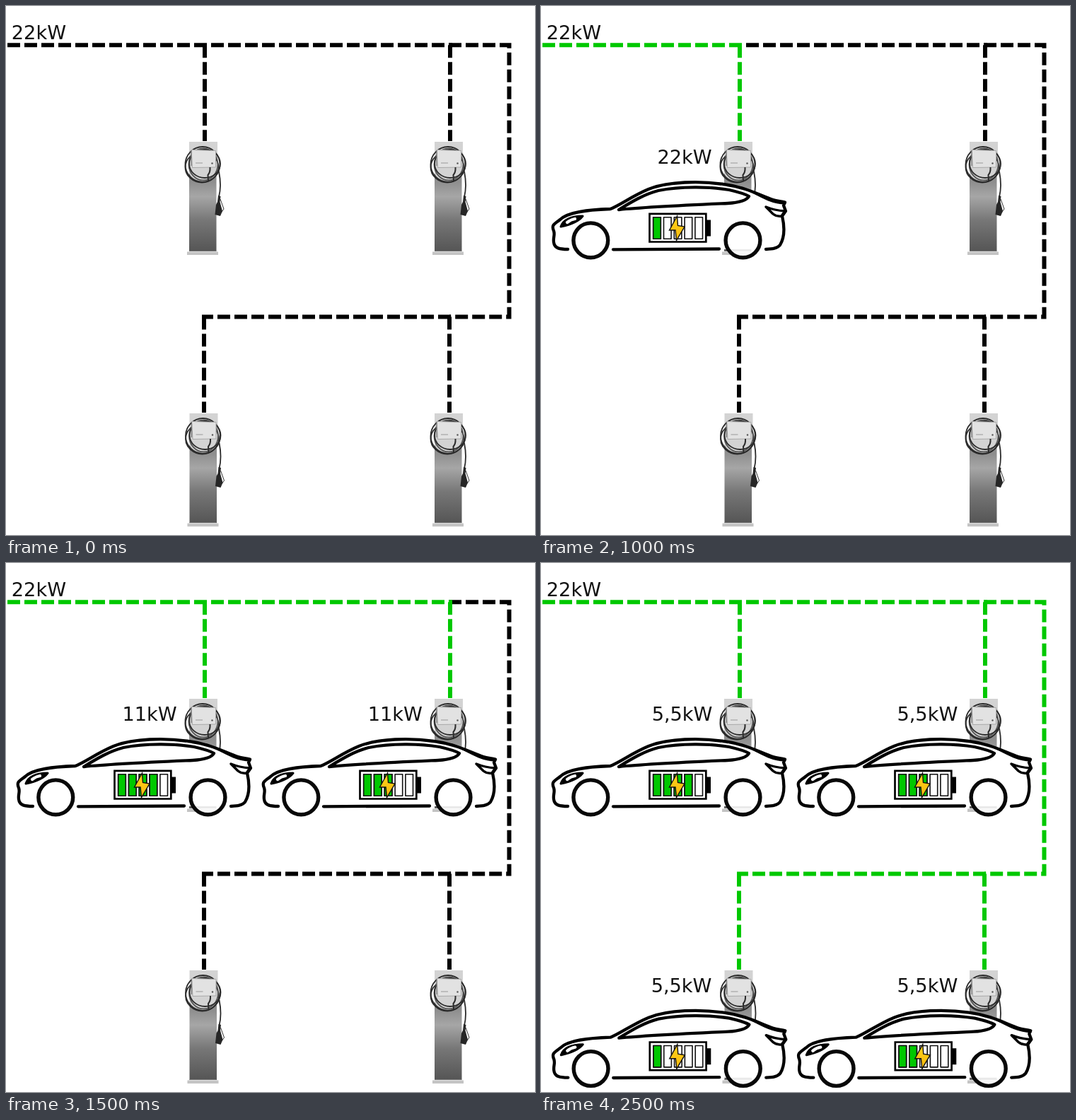
An HTML page for the animation above (3 s loop, 748 by 748 pixels).

```html
<!DOCTYPE html>
<html lang="en">
<head>
<meta charset="utf-8">
<title>Shared charging power</title>
<style>
html, body { margin: 0; width: 100%; height: 100%; overflow: hidden; background: #fff; }
svg { display: block; width: 100vw; height: 100vh; }
text { font: 27.2px "DejaVu Sans", sans-serif; fill: #111; }
.label { text-anchor: end; }
.wire { fill: none; stroke: #000; stroke-width: 6; stroke-dasharray: 18 6; }

/* one step = 500 ms; sN shows from step N, hN hides from it, gN turns green */
.wire, [class*="s"], [class*="h"] { animation: 3s step-end infinite; }
.s1 { animation-name: s1; }
.s2 { animation-name: s2; }
.s3 { animation-name: s3; }
.s4 { animation-name: s4; }
.s5 { animation-name: s5; }
.s2.h3 { animation-name: s2, h3; }
.s3.h4 { animation-name: s3, h4; }
.s4.h5 { animation-name: s4, h5; }
.g2 { animation-name: g2; }
.g3 { animation-name: g3; }
.g4 { animation-name: g4; }
.g5 { animation-name: g5; }
@keyframes s1 { 0% { visibility: hidden } 16.666%, 100% { visibility: visible } }
@keyframes s2 { 0% { visibility: hidden } 33.333%, 100% { visibility: visible } }
@keyframes s3 { 0% { visibility: hidden } 50%, 100% { visibility: visible } }
@keyframes s4 { 0% { visibility: hidden } 66.666%, 100% { visibility: visible } }
@keyframes s5 { 0% { visibility: hidden } 83.333%, 100% { visibility: visible } }
@keyframes h3 { 0% { opacity: 1 } 50%, 100% { opacity: 0 } }
@keyframes h4 { 0% { opacity: 1 } 66.666%, 100% { opacity: 0 } }
@keyframes h5 { 0% { opacity: 1 } 83.333%, 100% { opacity: 0 } }
@keyframes g2 { 0% { stroke: #000 } 33.333%, 100% { stroke: #00c800 } }
@keyframes g3 { 0% { stroke: #000 } 50%, 100% { stroke: #00c800 } }
@keyframes g4 { 0% { stroke: #000 } 66.666%, 100% { stroke: #00c800 } }
@keyframes g5 { 0% { stroke: #000 } 83.333%, 100% { stroke: #00c800 } }
</style>
</head>
<body>
<svg viewBox="0 0 748 748">
  <defs>
    <linearGradient id="steel" x1="0" y1="0" x2="0" y2="1">
      <stop offset="0" stop-color="#8c8c8c"/>
      <stop offset=".12" stop-color="#8f8f8f"/>
      <stop offset=".3" stop-color="#a6a6a6"/>
      <stop offset=".6" stop-color="#777"/>
      <stop offset="1" stop-color="#555"/>
    </linearGradient>
    <linearGradient id="spark" x1="0" y1="0" x2="0" y2="1">
      <stop offset="0" stop-color="#ffd21c"/>
      <stop offset="1" stop-color="#f9b90c"/>
    </linearGradient>

    <g id="station">
      <path d="M259 236H297.5V347H259Z" fill="url(#steel)"/>
      <path d="M259 192H299V234Q296 246 279 248Q262 246 259 236Z" fill="#d3d3d3"/>
      <path d="M256 347.5H300V352H256Z" fill="#c4c4c4"/>
      <path d="M259 346.5H297" stroke="#777"/>
      <g fill="none" stroke="#2b2b2b" stroke-width="1.8">
        <ellipse cx="278" cy="224" rx="24.5" ry="25"/>
        <ellipse cx="277" cy="228" rx="23.5" ry="21.5"/>
        <ellipse cx="279" cy="224" rx="20.500" ry="22.500" stroke="#555"/>
        <ellipse cx="281" cy="223" rx="22" ry="20"/>
        <path d="M301 234Q305 254 301 270"/>
      </g>
      <path d="M262 203.500L296.500 204.500V228L263.500 228.500Z" fill="#e2e2e2" stroke="#a9a9a9"/>
      <path d="M262 204V226" stroke="#777" stroke-width="1.200"/>
      <path d="M288.500 228Q289 235 285.500 239L286 247" fill="none" stroke="#2b2b2b" stroke-width="2"/>
      <path d="M268 222H278" stroke="#b4b4b4" stroke-width="1.600"/>
      <circle cx="291.500" cy="222.500" r="1.200" fill="#555"/>
      <path d="M300 268L303.500 269L302.500 277L306 290L303 297L295.500 295L297 281L299 277Z" fill="#262626"/>
      <path d="M303 273L308 287L303 294" fill="none" stroke="#333"/>
    </g>

    <path id="cell" d="M158.700 298.800H169.300V329.200H158.700Z" stroke="#111" stroke-width="1.600"/>

    <path id="shell" d="M38 344C27 344 19 343 18 334C17 327 20 324 18 318C14 309 20 308 27 302C38 291 67 288 98 287C111 282 130 268 152 259C180 248 225 247 258 252C290 256 310 268 328 274C334 276 340 276 345 277.500L343 282L346 290L341 297C345 314 344 328 338 338C334 343 327 343.500 318 344"/>

    <g id="car" stroke="#000" stroke-width="4.300" stroke-linecap="round" stroke-linejoin="round" fill="none">
      <use href="#shell" fill="#fff"/>
      <path d="M110 288C128 277 146 266 166 261C200 254 242 256 266 260C279 263 289 266 294 269C291 275 280 278 264 279C220 281 150 284 110 288Z"/>
      <path d="M299 263C314 271 329 279 345 279" stroke-width="3"/>
      <path d="M318 284Q330 289 345 290L340 297Q333 298 328 294Z" stroke-width="3.500"/>
      <path d="M28 312C31 302 43 297 59 297C53 305 42 309 28 312Z" fill="#000" stroke-width="3"/>
      <path d="M37 306Q42 302 48 301" stroke="#fff"/>
      <path d="M102 344.300L252 343.500"/>
      <g fill="#fff" fill-opacity=".87" stroke="#080808" stroke-width="5.400">
        <circle cx="70.300" cy="331.300" r="24.400"/>
        <circle cx="285.500" cy="331.300" r="24.400"/>
      </g>
      <path d="M153.500 293.800H233.300V333.500H153.500Z" fill="#fff" stroke-width="2.700" stroke-linejoin="miter"/>
      <path d="M234 302.500H240V325.500H234Z" fill="#000" stroke="none"/>
      <g fill="#fff">
        <use href="#cell"/>
        <use href="#cell" x="14.800"/>
        <use href="#cell" x="29.600"/>
        <use href="#cell" x="44.400"/>
        <use href="#cell" x="59.200"/>
      </g>
    </g>

    <path id="bolt" d="M192.500 297L181.500 317H190L191.500 331.500L203 312L193.500 310.500Z" fill="url(#spark)" stroke="#111" stroke-width="1.400"/>
  </defs>

  <rect width="748" height="748" fill="#fff"/>

  <path class="wire g5" d="M629 439.500H277M280 439.500V575"/>
  <path class="wire g4" d="M626 55.300H711.500V439.500H627M627 439.500V575"/>
  <path class="wire g3" d="M290 55.300H631M628 55.300V191"/>
  <path class="wire g2" d="M2 55.300H284M281 55.300V191"/>

  <use href="#station"/>
  <use href="#station" x="347"/>
  <use href="#station" x=".5" y="384"/>
  <use href="#station" x="347" y="384"/>

  <g fill="#00c800">
    <g class="s1">
      <use href="#car"/>
      <use href="#cell"/>
    </g>
    <g class="s3">
      <use href="#cell" x="14.800"/>
      <use href="#cell" x="29.600"/>
      <use href="#cell" x="44.400"/>
    </g>
    <use class="s2" href="#bolt"/>

    <g class="s3" transform="translate(347 0)">
      <use href="#car"/>
      <use href="#cell"/>
      <use href="#cell" x="14.800"/>
      <use href="#cell" x="29.600"/>
      <use href="#bolt"/>
    </g>

    <g class="s4" transform="translate(347.300 383.700)">
      <use href="#car"/>
      <use href="#cell"/>
      <use href="#cell" x="14.800"/>
      <use href="#bolt"/>
    </g>

    <g class="s5" transform="translate(.3 383.700)">
      <use href="#car"/>
      <use href="#cell"/>
      <use href="#bolt"/>
    </g>
  </g>

  <text x="7.800" y="46.800">22kW</text>
  <g class="label">
    <text class="s2 h3" x="241.700" y="222.800">22kW</text>
    <text class="s3 h4" x="241.700" y="222.800">11kW</text>
    <text class="s3 h4" x="589" y="222.800">11kW</text>
    <text class="s4 h5" x="242.500" y="222.800">7,3kW</text>
    <text class="s4 h5" x="589.300" y="222.800">7,3kW</text>
    <text class="s4 h5" x="589.300" y="606.800">7,3kW</text>
    <text class="s5" x="242.500" y="222.800">5,5kW</text>
    <text class="s5" x="589.300" y="222.800">5,5kW</text>
    <text class="s5" x="241.500" y="606.800">5,5kW</text>
    <text class="s5" x="589.300" y="606.800">5,5kW</text>
  </g>
</svg>
</body>
</html>
```
